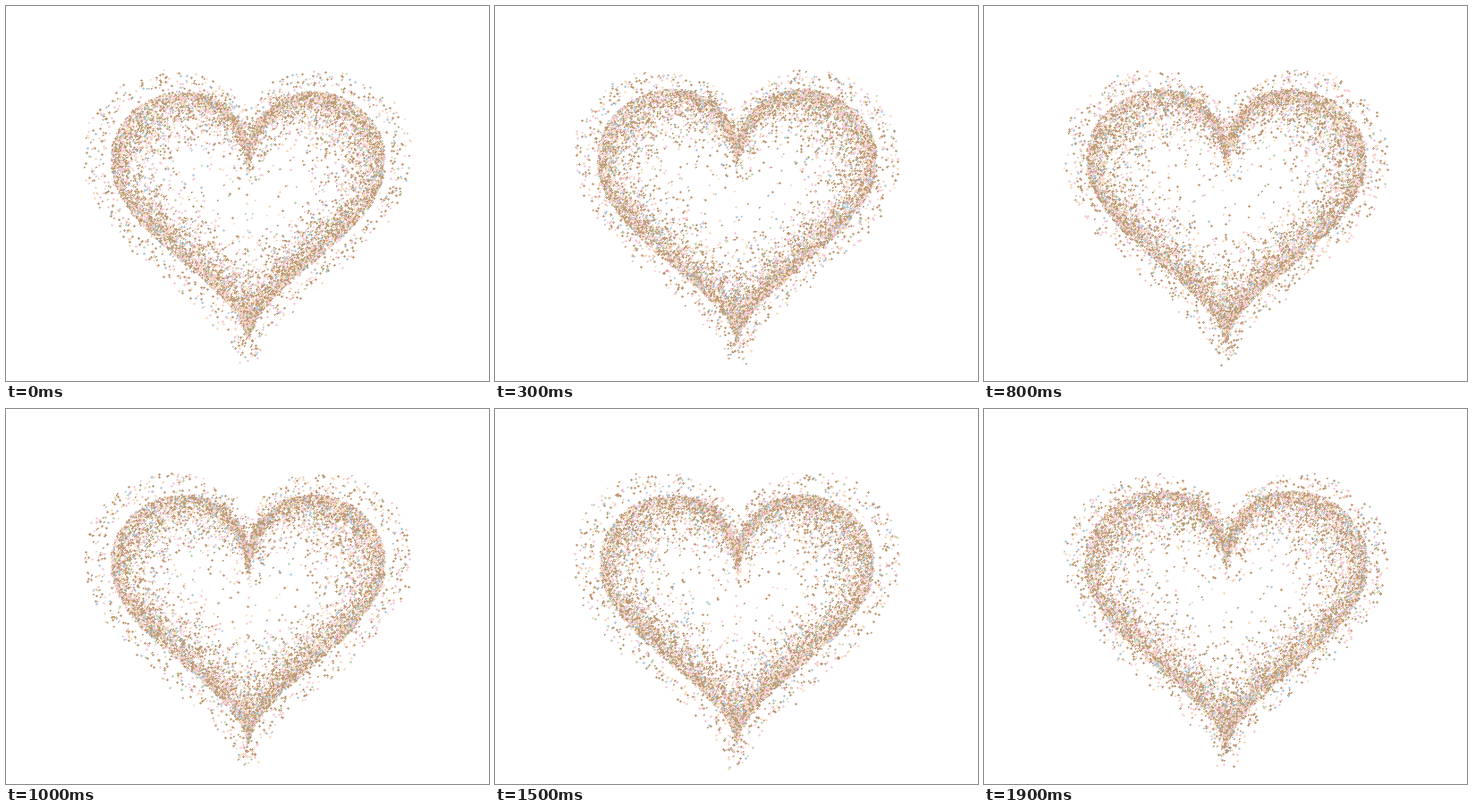
Write an HTML page with a canvas that moves like this. It is 540 px wide and 420 px high and loops after 2000 ms.

```html
<!DOCTYPE html>
<html lang="en">
<head>
<meta charset="utf-8">
<title>Beating heart</title>
<style>
  html, body { margin: 0; width: 100%; height: 100%; overflow: hidden; background: #fff; }
  canvas { display: block; }
</style>
</head>
<body>
<canvas id="stage" width="540" height="420"></canvas>
<script>
const ctx = document.getElementById('stage').getContext('2d');
const WIDTH = 540, HEIGHT = 420, CX = WIDTH / 2, CY = HEIGHT / 2;
const STEP = 100, STEPS = 20;
const HEART_SCALE = 9.5, HALO_SCALE = 10.5, HALO_SPREAD = 11;
const TAN = '#c19d78', PINK = '#f6c9da', CREAM = '#f8dabb', BLUE = '#a9c9e2', GREEN = '#b9d3b2';
const COLORS = [TAN, TAN, TAN, TAN, TAN, TAN, PINK, PINK, PINK, CREAM, CREAM, CREAM, BLUE, GREEN];

// Seeded generator (mulberry32)
function seeded(seed) {
  return () => {
    seed = (seed + 0x6d2b79f5) | 0;
    let n = Math.imul(seed ^ (seed >>> 15), 1 | seed);
    n = (n + Math.imul(n ^ (n >>> 7), 61 | n)) ^ n;
    return ((n ^ (n >>> 14)) >>> 0) / 4294967296;
  };
}
const randInt = (rnd, lo, hi) => lo + Math.floor(rnd() * (hi - lo + 1));
const pick = (rnd, list) => list[Math.floor(rnd() * list.length)];

function heartPoint(t, scale) {
  const x = 16 * Math.sin(t) ** 3;
  const y = 5 * Math.cos(2 * t) + 2 * Math.cos(3 * t) + Math.cos(4 * t) - 13 * Math.cos(t);
  return [Math.floor(x * scale + CX), Math.floor(y * scale + CY)];
}

// Distinct whole-pixel points on the heart outline
function outline(rnd, count, scale) {
  const found = new Map();
  for (let i = 0; i < count; i++) {
    const p = heartPoint(rnd() * 2 * Math.PI, scale);
    found.set(p[0] * 1000 + p[1], p);
  }
  return [...found.values()];
}

function scatterInside(rnd, [x, y], beta) {
  const fall = () => 1 + beta * Math.log(1 - rnd());
  return [CX + (x - CX) * fall(), CY + (y - CY) * fall()];
}

// Moves a point away from the centre; a negative amount pulls it in
function push([x, y], amount, power) {
  const dx = x - CX, dy = y - CY;
  const force = amount / Math.max(dx * dx + dy * dy, 1) ** power;
  return [x + dx * force, y + dy * force];
}

const baseRnd = seeded(2024);
const edge = outline(baseRnd, 2000, HEART_SCALE);
const scatter = (count, beta) =>
  Array.from({ length: count }, () => scatterInside(baseRnd, pick(baseRnd, edge), beta));
const rim = scatter(3600, 0.07);
const core = scatter(6000, 0.155);

function dot(rnd, [px, py], jitter, size) {
  const x = Math.round(px + randInt(rnd, -jitter, jitter));
  const y = Math.round(py + randInt(rnd, -jitter, jitter));
  ctx.fillStyle = pick(rnd, COLORS);
  if (size === 1) {
    ctx.fillRect(x, y, 2, 1);
    ctx.fillRect(x, y + 1, 1, 1);
  } else {
    ctx.fillRect(x, y + 1, 3, 1);
    ctx.fillRect(x + 1, y, 1, 3);
  }
}

function draw(step) {
  const rnd = seeded(step * 977 + 5);
  const beat = 2 / Math.PI * Math.sin(step * 0.4 * Math.PI);
  const haloPush = Math.floor(4 + 6 * (1 + beat));
  const haloCount = Math.floor(2000 + 2500 * beat * beat);

  ctx.fillStyle = '#fff';
  ctx.fillRect(0, 0, WIDTH, HEIGHT);
  for (const p of outline(rnd, haloCount, HALO_SCALE)) {
    dot(rnd, push(p, haloPush, 0.6), HALO_SPREAD, pick(rnd, [1, 2, 2]));
  }
  for (const group of [edge, rim, core]) {
    for (const p of group) dot(rnd, push(p, -10 * beat, 0.52), 1, randInt(rnd, 1, 2));
  }
}

const start = performance.now();
let shown = -1;
function tick() {
  const step = Math.floor((performance.now() - start) / STEP) % STEPS;
  if (step !== shown) draw(shown = step);
  requestAnimationFrame(tick);
}
tick();
</script>
</body>
</html>
```
